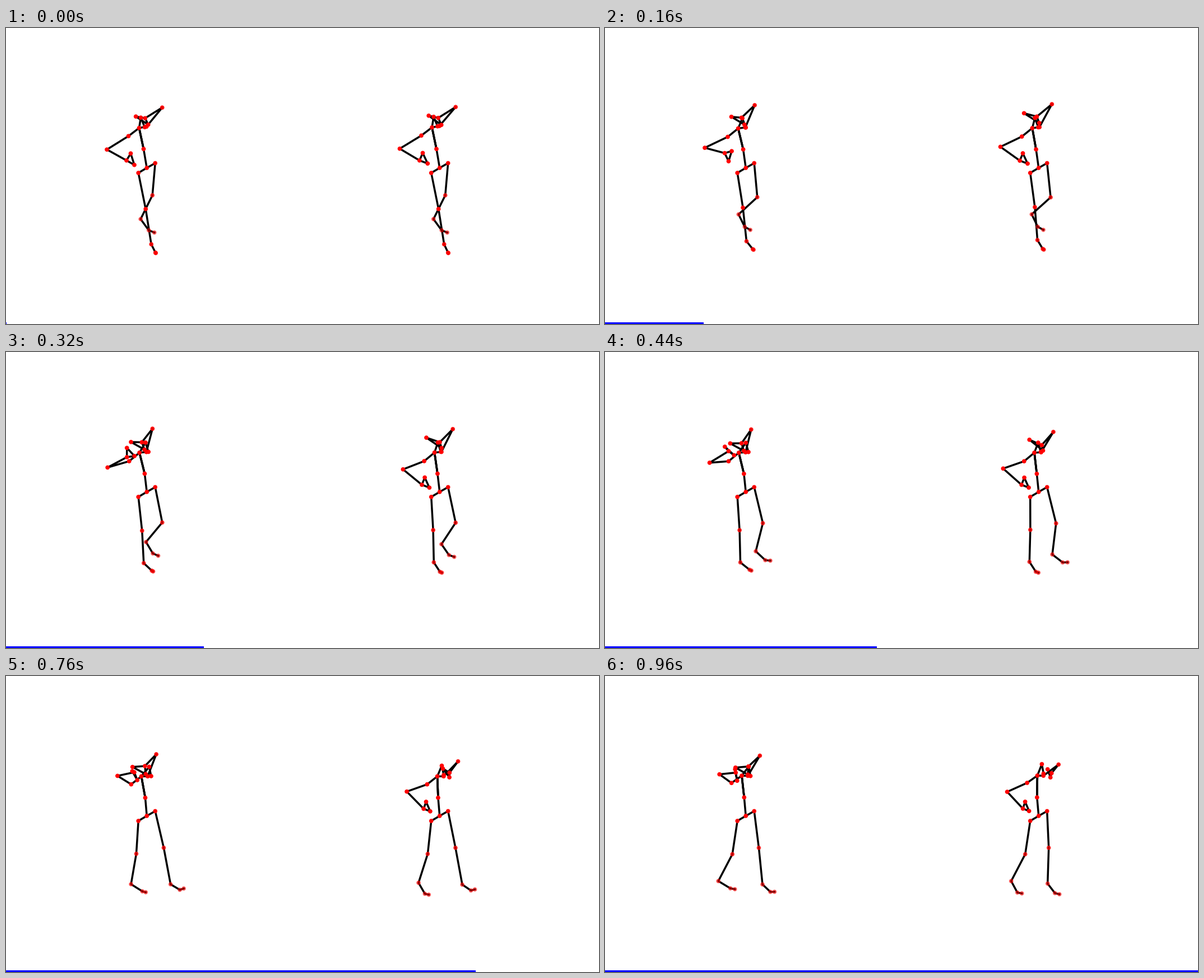
Animation of 1058x529 px, one loop 1 s. Source, as a matplotlib script:

```python
import numpy as np
import matplotlib.pyplot as plt
from matplotlib.animation import FuncAnimation

W, H, DPI = 1058, 529, 64
FRAMES = 25
PX = 72 / DPI  # points per pixel

PARENT = {
    "hip_l": "root", "hip_r": "root",
    "spine": "root", "chest": "spine", "neck": "chest", "head": "neck",
}
for side in "lr":
    arm = ["chest"] + [f"{part}_{side}" for part in ("shoulder", "elbow", "wrist")]
    leg = [f"{part}_{side}" for part in ("hip", "knee", "ankle", "ball", "toe")]
    for chain in (arm, leg):
        PARENT.update(zip(chain[1:], chain))
    PARENT[f"tip_{side}"] = PARENT[f"thumb_{side}"] = f"wrist_{side}"

CHAINS = [("hip_l", "root", "hip_r"), ("root", "spine", "chest", "neck", "head")]
for side in "lr":
    parts = ("shoulder", "elbow", "wrist", "tip", "thumb", "wrist")
    CHAINS.append(("spine", "chest", *(f"{p}_{side}" for p in parts)))
    CHAINS.append([f"{p}_{side}" for p in ("hip", "knee", "ankle", "ball", "toe")])

# Opacity falls off down the legs
FADE = {"hip": 0.92, "knee": 0.7, "ankle": 0.55, "ball": 0.5, "toe": 0.5,
        "elbow_r": 0.87}

# Each joint's way relative to its parent: key points evenly spaced in time
GAIT = {
    "hip_l": [(-15, 9)],
    "hip_r": [(15, -8.5)],
    "spine": [(-5.7, -33.8), (-3.2, -32.3), (-2.9, -33)],
    "head": [(7, 17), (4.5, 16.5), (3, 17)],
    "shoulder_l": [(-19, 14.5), (-18.2, 15.2), (-18.3, 13)],
    "shoulder_r": [(13.2, -2.5), (12, -0.7), (10.8, 0.2)],
    "knee_l": [(13, 64.5), (3, 59.2), (-9, 59.5)],
    "ankle_l": [(10, 63), (3, 58), (-3, 56.8), (-25, 48)],
    "toe_l": [(0.5, 0.7), (3.5, 1.5), (8, 1.5)],
    "knee_r": [(-5, 57.5), (10.5, 62.5), (16.5, 65), (14.5, 65.5), (3, 65.5)],
    "ankle_r": [(-21, 42.5), (-33, 31), (-2, 59.5), (12.5, 65.5), (-2, 64)],
    "ball_r": [(14.5, 20), (11, 21.7), (19.3, 13), (16, 10), (13, 17)],
    "toe_r": [(10, 4), (9.7, 5), (8.5, -1), (7, -2.2), (8, 2)],
}

REACHING = {
    "chest": [(-8, -37.5), (-9, -37.7), (-4.3, -38.8)],
    "neck": [(3, -18.5), (13, -17.7), (12.5, -16.5)],
    "ball_l": [(7.5, 15), (17, 13), (21.5, 13)],
    "elbow_l": [(-38.5, 24), (-40.5, 16), (-32.5, 0), (-25.3, -14), (-21.5, -15.5)],
    "wrist_l": [(35, 19.5), (35.5, 9.5), (34.5, -18.5), (33.5, -19.5),
                (30, -8.5), (30, -6), (29, -3)],
    "tip_l": [(14, 8), (7, 14.5), (13.5, -2), (8.5, 10.5),
              (6, 14), (5, 14), (2.5, 14.5)],
    "thumb_l": [(7.5, -12.5), (12.5, -3.5), (0, -16.5), (-8, -5),
                (-7.5, -1), (-2.5, -2.5), (-1, -6)],
    "elbow_r": [(28, -34), (13, -41.3), (10, -40.5), (14.3, -39.8), (21.5, -36)],
    "wrist_r": [(-30.5, 19), (-21, 23.5), (-17, 24.5), (-20, 21.5), (-20.5, 19.3)],
    "tip_r": [(-16.5, -3), (-20.5, 0.5), (-23, 2)],
    "thumb_r": [(5.5, 11.5), (3.8, 13.7), (-1, 14.5)],
}

RESTING = {
    "chest": [(-8, -38.5), (-4, -37.7), (0.6, -39)],
    "neck": [(3, -19), (7, -18), (8, -20.5)],
    "ball_l": [(7, 15), (11, 17), (11, 20.5)],
    "elbow_l": [(-38.5, 23.5), (-37.3, 12.7), (-35.5, 16)],
    "wrist_l": [(35.3, 21), (32.5, 29.5), (28, 30)],
    "tip_l": [(14.5, 5.5), (11, 4.3)],
    "thumb_l": [(5.7, -13.3), (4, -12.3)],
    "elbow_r": [(29, -34), (20.5, -42), (22.3, -35), (25.3, -28), (27, -20)],
    "wrist_r": [(-31, 19.5), (-20, 23.5), (-12.5, 15.5)],
    "tip_r": [(-17, -4), (-24, -7), (-21, -9.8), (-13, -7.5), (-7, -7)],
    "thumb_r": [(5.5, 12.5), (2, 9.5), (-2, 7.5)],
}


def glide(points, u):
    """Smooth curve through evenly timed points, at u from 0 to 1."""
    p = np.array(points, float)
    n = len(p) - 1
    if n == 0:
        return p[0]
    m = np.gradient(p, axis=0, edge_order=min(n, 2))
    k = min(int(u * n), n - 1)
    s = u * n - k
    return ((1 + 2 * s) * (1 - s) ** 2 * p[k] + s * (1 - s) ** 2 * m[k]
            + s * s * (3 - 2 * s) * p[k + 1] - s * s * (1 - s) * m[k + 1])


class Walker:
    """A stick figure; its legs run through the gait on their own clocks."""

    def __init__(self, x, arms, lead=0.0, pace=1.0):
        self.paths = {"root": [(x, 250)], **GAIT, **arms}
        self.lead, self.pace = lead, pace
        self.lines = [ax.plot([], [], color="black", lw=3.5 * PX, zorder=2)[0]
                      for _ in CHAINS]
        zero = np.zeros(len(self.paths))
        self.dots = ax.scatter(zero, zero, s=(6.2 * PX) ** 2,
                               linewidths=1.5 * PX, zorder=3)

    def clock(self, name, u):
        part, _, side = name.partition("_")
        if part not in ("knee", "ankle", "ball", "toe"):
            return u
        if side == "l":
            return min(u + self.lead * np.sin(np.pi * u), 1)
        return u * self.pace

    def place(self, name, u):
        spot = glide(self.paths[name], self.clock(name, u))
        if name in PARENT:
            spot = spot + self.place(PARENT[name], u)
        return spot

    def color(self, name, u):
        part, _, side = name.partition("_")
        alpha = FADE.get(name, FADE.get(part, 1))
        if side == "l" and part in FADE:
            alpha = min(1, alpha + 0.3 * (1 - u) ** 2)
        return (1, 0, 0, alpha)

    def pose(self, u):
        spots = {name: self.place(name, u) for name in self.paths}
        for line, chain in zip(self.lines, CHAINS):
            line.set_data(*np.transpose([spots[name] for name in chain]))
        self.dots.set_offsets(list(spots.values()))
        self.dots.set_color([self.color(name, u) for name in spots])


fig = plt.figure(figsize=(W / DPI, H / DPI), dpi=DPI, facecolor="white")
ax = fig.add_axes([0, 0, 1, 1])
ax.set(xlim=(0, W), ylim=(H, 0))
ax.axis("off")

walkers = [Walker(251.2, REACHING, pace=0.91),
           Walker(773.7, RESTING, lead=0.17)]
bar, = ax.plot([], [], color="blue", lw=6 * PX, solid_capstyle="butt", zorder=4)


def update(i):
    u = i / (FRAMES - 1)
    for walker in walkers:
        walker.pose(u)
    bar.set_data([0, max(W * u, 1.3)], [H, H])
    return [bar]


anim = FuncAnimation(fig, update, frames=FRAMES, interval=40,
                     repeat=True, repeat_delay=0)
plt.show()
```
